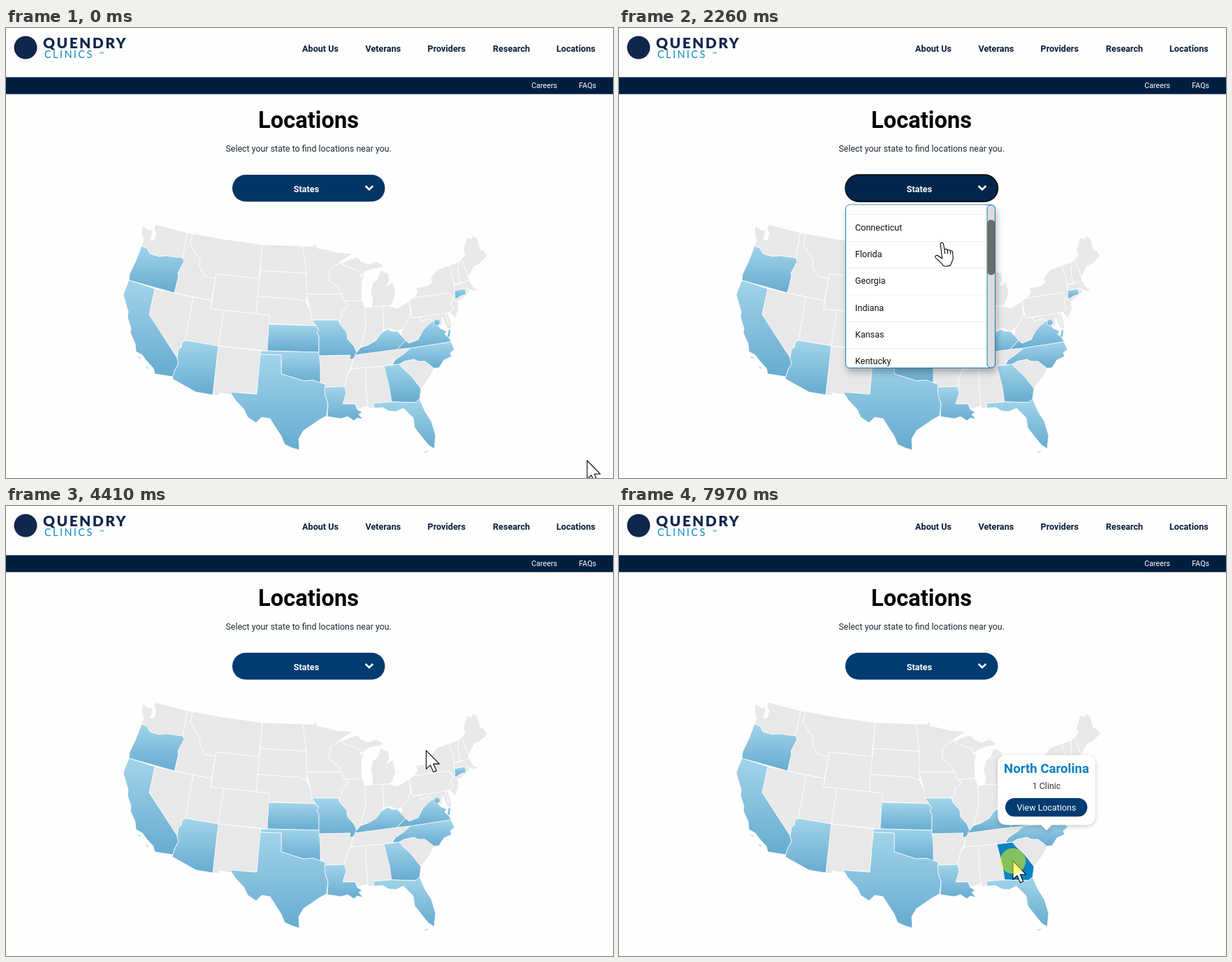
An HTML page that plays this animation: 869 px wide and 644 px high, repeating every 8000 ms.

```html
<!DOCTYPE html>
<html lang="en">
<head>
<meta charset="utf-8">
<title>Locations</title>
<style>
html, body { margin: 0; width: 100%; height: 100%; overflow: hidden; background: #fefefe; }
svg { display: block; width: 100%; height: 100%; font: 12.5px Roboto, sans-serif; }
.b { font-weight: 700; }
.m { text-anchor: middle; }
#map polygon { stroke: #fff; stroke-width: .75; stroke-linejoin: round; }
#grey { fill: #e8e8e8; }
#blue { fill: url(#sky); }
.on { fill: #0a82c4; }
.card { filter: drop-shadow(0 2px 3px #0003); }
</style>
</head>
<body>
<svg viewBox="0 0 869 644">
<defs>
  <linearGradient id="sky" x2="0" y2="1"><stop stop-color="#a2d4ea"/><stop offset="1" stop-color="#66abd0"/></linearGradient>
  <clipPath id="listClip"><rect x="325.5" y="253.5" width="202" height="232" rx="5"/></clipPath>
</defs>
<rect width="869" height="644" fill="#fefefe"/>
<circle cx="28" cy="28" r="16.5" fill="#10264d"/>
<text x="53" y="29" class="b" fill="#10264d" style="font:900 21px Lato,sans-serif;letter-spacing:2.4px">QUENDRY</text>
<text x="55" y="42.5" fill="#1287c6" style="font:14.5px Lato,sans-serif;letter-spacing:2.4px">CLINICS</text>
<text x="134" y="37" fill="#1287c6" font-size="4">SM</text>
<g class="b" font-size="12.65" fill="#071d3b">
  <text x="424" y="34.2">About Us</text><text x="514.5" y="34.2">Veterans</text><text x="603.5" y="34.2">Providers</text>
  <text x="697" y="34.2">Research</text><text x="788" y="34.2">Locations</text>
</g>
<rect y="70.4" width="869" height="24.2" fill="#001f40"/>
<g font-size="10.7" fill="#fff"><text x="752.3" y="86">Careers</text><text x="820.3" y="86">FAQs</text></g>
<text x="433" y="143" class="b m" font-size="32.7">Locations</text>
<text x="433.2" y="177.3" class="m" font-size="12.43" fill="#1d2939">Select your state to find locations near you.</text>

<g id="map">
<g id="grey">
<polygon points="195,283 204,289 210,289 208,300 206,304 212,303 215,294 212,287 214,281 260,293 253,329 230,326 219,327 206,323 202,315 194,312 197,303 194,295"/>
<polygon points="260,293 267,294 264,309 271,322 278,331 277,341 284,355 293,357 300,358 294,390 241,379 247,355 246,351 255,334 253,329"/>
<polygon points="267,294 310,302 367,310 362,359 301,352 300,358 293,357 284,355 277,341 278,331 271,322 264,309"/>
<polygon points="213,373 268,385 257,447 252,450 250,458 245,472 205,410"/>
<polygon points="268,385 294,390 293,402 312,404 304,455 257,447"/>
<polygon points="301,352 363,359 359,409 293,402"/>
<polygon points="312,404 378,411 374,462 304,455"/>
<polygon points="304,455 365,462 359,524 321,521 325,525 306,522 304,526 296,525"/>
<polygon points="367,310 425,312 428,330 430,351 364,347"/>
<polygon points="364,347 430,351 431,381 430,392 418,388 400,387 360,384"/>
<polygon points="360,384 400,387 418,388 430,392 436,405 439,418 444,426 376,423 378,411 359,409"/>
<polygon points="425,312 441,312 443,308 446,315 458,317 472,321 484,322 497,323 482,332 472,340 465,345 463,353 463,362 476,372 481,381 430,381 430,351"/>
<polygon points="430,381 481,381 484,390 490,395 487,401 481,404 481,412 477,418 438,418 436,405"/>
<polygon points="448,469 493,468 492,474 497,474 494,485 488,498 485,513 455,514 455,509 450,508"/>
<polygon points="465,345 472,340 479,336 485,340 497,345 506,348 508,357 513,352 509,366 510,390 484,391 481,381 476,372 463,362 463,353"/>
<polygon points="480,337 492,331 504,328 508,334 519,338 530,334 541,340 536,343 524,345 514,349 508,355 506,348 497,345 485,340"/>
<polygon points="523,400 525,390 522,378 525,365 532,359 536,347 547,351 549,361 545,369 554,363 558,380 553,394 549,398 539,398"/>
<polygon points="484,391 510,390 514,400 515,428 512,440 508,456 502,464 498,455 489,445 488,436 478,424 477,418 481,412 481,404 487,401 490,395"/>
<polygon points="514,400 539,398 541,432 536,438 530,447 518,454 508,456 512,440 515,428"/>
<polygon points="539,398 549,398 561,401 577,391 579,408 575,420 567,431 560,434 550,430 541,432"/>
<polygon points="499,467 560,460 579,458 570,466 557,475 552,482 541,484 494,488 497,474"/>
<polygon points="494,488 515,486 516,520 518,541 504,545 500,538 482,538 487,523 485,513 488,498"/>
<polygon points="515,486 541,484 550,515 553,535 526,537 527,543 520,545 518,541 516,520"/>
<polygon points="563,481 570,477 584,474 590,477 600,477 613,487 607,499 594,516 588,508 580,498 568,487"/>
<polygon points="567,431 575,420 579,408 582,415 592,414 594,420 606,416 611,419 602,427 596,434 590,446 577,451 571,447 566,440"/>
<polygon points="592,414 629,407 633,423 638,424 637,431 632,430 628,422 625,414 624,427 617,424 611,419 606,416 594,420"/>
<polygon points="629,407 633,409 638,424 633,423"/>
<polygon points="579,389 584,386 634,379 640,386 637,395 641,399 637,406 629,408 582,415 577,391"/>
<polygon points="640,386 647,390 648,402 643,415 636,408 641,399 637,395"/>
<polygon points="584,386 589,378 587,372 604,369 610,364 608,358 617,346 634,340 640,357 642,372 643,387 663,379 652,388 645,392 640,386 634,379"/>
<polygon points="642,368 656,364 663,361 667,368 671,373 676,373 672,377 664,375 657,373 642,376"/>
<polygon points="657,373 662,373 663,379 659,381"/>
<polygon points="634,340 648,335 647,347 650,365 642,367 639,355"/>
<polygon points="648,335 652,331 662,356 663,361 656,364 650,365 647,347"/>
<polygon points="652,331 657,325 655,316 660,300 666,302 669,297 675,302 679,317 684,319 689,326 678,337 670,341 662,356"/>
</g>
<g id="blue">
<polygon points="194,312 202,315 206,323 219,327 230,326 253,329 255,334 246,351 247,355 241,379 176,361 177,352 186,333"/>
<polygon points="176,361 213,373 205,410 245,472 247,480 242,489 239,499 213,495 211,487 201,476 195,468 186,463 185,452 178,436 179,430 174,414 175,406 172,396 168,382 171,373"/>
<polygon points="257,447 304,455 296,525 272,521 238,502 242,489 247,480 245,472 247,460 251,457 252,450"/>
<polygon points="376,424 443,426 448,432 445,435 448,441 448,464 374,462"/>
<polygon points="365,462 448,464 450,485 450,508 440,504 426,505 410,500 394,495 394,468 364,467"/>
<polygon points="364,467 394,468 394,495 410,500 426,505 440,504 457,510 457,526 461,538 459,555 448,561 438,568 426,576 419,588 420,604 410,601 399,596 394,584 383,567 378,559 366,557 358,565 346,557 341,546 328,532 321,521 359,524"/>
<polygon points="438,418 476,418 478,424 488,436 489,445 498,455 502,464 500,469 496,474 492,474 493,468 448,469 448,441 445,435 448,432"/>
<polygon points="456,514 485,513 487,523 482,538 500,538 503,546 510,550 505,553 511,560 503,558 498,562 489,556 480,559 460,556 461,538 457,526"/>
<polygon points="541,434 547,431 552,434 560,434 566,440 572,447 560,460 499,468 502,464 508,457 518,454 530,447 536,438"/>
<polygon id="GA" points="541,484 563,481 568,487 580,498 588,508 594,516 592,533 586,536 552,535 549,515"/>
<polygon points="526,537 552,535 586,536 592,531 600,549 609,563 615,583 613,602 605,597 596,586 585,572 583,558 569,544 558,549 548,548 539,543 527,544"/>
<polygon id="NC" points="553,482 557,475 570,466 579,458 637,449 642,460 636,465 638,470 627,475 620,486 613,487 600,477 590,477 584,474 570,477 563,481"/>
<polygon id="VA" points="560,460 572,447 577,451 590,446 596,434 602,427 611,419 617,424 622,430 631,434 628,438 634,443 637,449 579,458"/>
<polygon points="633,432 637,431 635,443 632,441"/>
<polygon points="642,376 657,373 659,381 652,383 643,388"/>
<circle cx="617" cy="421" r="4.5" stroke="#fff" stroke-width=".8"/>
<path d="M187 470l7 2-3 1zM200 483l4 4-2 1zM598 608l8-3-5 1z"/>
</g>
</g>

<rect id="btn" x="324" y="210" width="218.5" height="38.5" rx="19.2" stroke-width="1.4"/>
<text x="430" y="235" class="b m" font-size="12.6" fill="#fff">States</text>
<path d="M514.7 226l5.3 5.2 5.3-5.2" fill="none" stroke="#fff" stroke-width="2.6"/>

<g id="menu">
  <rect x="324.5" y="253" width="214" height="233.5" rx="6" fill="#fff" stroke="#1580bd" style="filter:drop-shadow(2px 6px 5px #0004)"/>
  <g clip-path="url(#listClip)"><g id="rows" font-size="12.6" fill="#111"></g></g>
  <rect x="527" y="253.5" width="11.5" height="232.5" rx="5" fill="#dcdcdc" stroke="#1580bd"/>
  <rect id="thumb" x="527.3" y="253.5" width="11" height="79" rx="5" fill="#6b6b6b"/>
</g>
<g id="cards"></g>
<g id="hint">
  <rect x="620.5" y="477.5" width="72" height="19" fill="#fff" stroke="#8a8a8a"/>
  <text x="657" y="490.3" class="m" style="font:9.6px 'Open Sans',sans-serif" fill="#444">North Carolina</text>
</g>
<g id="cursor" fill="#fff" stroke="#000" stroke-width="1.1" stroke-linejoin="round">
  <path id="arrow" d="M0 0V26.5L6 21 10.5 31 14.7 29.2 10.3 19.3H18.8Z"/>
  <path id="hand" d="M-1.8 2C-1.8-.5 2-.5 2.4 2L4 10C5.5 8.8 7.8 9.2 8.3 11 9.8 10 11.8 10.5 12.3 12 13.8 11.4 15.6 12.2 15.7 14L16.3 22C16 27 13.2 29 12.8 32.5 9 34.3 5 34.3 2 33 0 29-6 25-9 21.5-10.4 18.6-6.8 17.6-4.8 19.2L.7 23ZM4 10l.6 6M8.3 11l.4 5M12.3 12l.3 4.5"/>
</g>
<circle id="press" r="18.3" fill="#ff0" opacity=".5"/>
</svg>
<script>
const $ = id => document.getElementById(id);
const LOOP = 8000, ROW = 38.33, TOP = 253;
const states = ['Arizona', 'California', 'Connecticut', 'Florida', 'Georgia', 'Indiana', 'Kansas', 'Kentucky', 'Louisiana',
  'Michigan', 'Missouri', 'North Carolina', 'Ohio', 'Oklahoma', 'Oregon', 'Texas', 'Virginia', 'Washington DC'];

$('rows').innerHTML = states.map((name, i) => {
  const y = TOP + i * ROW;
  return `<rect x="325" y="${y}" width="203" height="${ROW}" fill="#fff"/>
    <path d="M325 ${y + ROW}h203" stroke="#d9d9d9"/><text x="338" y="${y + 22.6}">${name}</text>`;
}).join('');
const rowRects = [...$('rows').querySelectorAll('rect')];

const card = (id, name, x, y) => `<g id="${id}" class="card" transform="translate(${x} ${y})">
  <path d="M-56-100H56q14 0 14 14V-14q0 14-14 14H8L0 8-8 0H-56q-14 0-14-14V-86q0-14 14-14z" fill="#fff"/>
  <text y="-74.5" class="b m" font-size="18.65" fill="#0a7fc1">${name}</text>
  <text y="-51.5" class="m" font-size="12.4" fill="#333">1 Clinic</text>
  <rect x="-59" y="-38.5" width="117.5" height="26.5" rx="13.2" fill="#003b71"/>
  <text y="-21" class="m" fill="#fff">View Locations</text></g>`;
$('cards').innerHTML = card('cardNC', 'North Carolina', 612, 456.5) + card('cardVA', 'Virginia', 606.7, 433);

// Keys are [time, ...values]; EASE at the end marks an eased arrival.
const EASE = {};
const path = [
  [20, 832, 619], [810, 460, 231, EASE], [1560, 460, 231], [1610, 461, 238], [1960, 462, 307, EASE],
  [3640, 462, 307], [3700, 484, 312], [3950, 545, 325], [4300, 596, 340], [4480, 605, 356],
  [4720, 630, 415], [4960, 607, 441], [5590, 607, 441], [6050, 612, 465, EASE], [7260, 612, 465], [7770, 564, 508, EASE]
];
const scrollKeys = [[2070, 0], [2720, 300, EASE], [2880, 233], [3550, 0]];
const clicks = [[1080, 1220], [5130, 5270], [6710, 6850], [7970, 8000]];

const clamp = v => Math.max(0, Math.min(1, v));
const ramp = (t, a, b) => clamp((t - a) / (b - a));
const within = (t, a, b) => t >= a && t < b;

function sample(keys, t, n) {
  const i = keys.findIndex(k => k[0] > t);
  if (i === 0) return keys[0][n];
  if (i < 0) return keys[keys.length - 1][n];
  const a = keys[i - 1], b = keys[i];
  let p = ramp(t, a[0], b[0]);
  if (b.includes(EASE)) p = p * p * (3 - 2 * p);
  return a[n] + (b[n] - a[n]) * p;
}

const show = (id, on) => $(id).style.display = on ? '' : 'none';
const fade = (id, v) => { show(id, v > 0); $(id).style.opacity = v; };

function draw(t) {
  const x = sample(path, t, 1), y = sample(path, t, 2), scroll = sample(scrollKeys, t, 1);
  const open = ramp(t, 1180, 1420) * (1 - ramp(t, 3950, 4180));
  const onButton = x > 324 && x < 542 && y > 210 && y < 249;
  const onList = open > 0 && x > 325 && x < 538 && y > TOP && y < 486;
  const focus = within(t, 1080, 4000);

  $('btn').setAttribute('fill', onButton || focus ? '#00264b' : t < 1000 ? '#003565' : '#003b71');
  $('btn').setAttribute('stroke', focus ? '#000' : 'none');

  fade('menu', open);
  $('rows').setAttribute('transform', `translate(0 ${-scroll})`);
  $('thumb').setAttribute('y', 253.5 + scroll * 79 / 235);
  const hot = onList && !within(t, 2080, 3560) ? Math.floor((y - TOP + scroll) / ROW) : -1;
  rowRects.forEach((r, i) => r.setAttribute('fill', i === hot ? '#dcdcdc' : '#fff'));

  $('VA').classList.toggle('on', within(t, 4720, 5800));
  $('NC').classList.toggle('on', within(t, 5800, 7480));
  $('GA').classList.toggle('on', t >= 7560);

  fade('cardVA', ramp(t, 5170, 5370) * (1 - ramp(t, 6820, 7060)));
  fade('cardNC', ramp(t, 6810, 6980));
  show('hint', within(t, 6340, 6710));

  const hand = onButton || onList;
  show('hand', hand);
  show('arrow', !hand);
  $('cursor').setAttribute('transform', `translate(${x} ${y})`);
  $('press').setAttribute('transform', `translate(${x} ${y})`);
  show('press', clicks.some(c => within(t, c[0], c[1])));
}

const start = performance.now();
function tick() {
  draw((performance.now() - start) % LOOP);
  requestAnimationFrame(tick);
}
draw(0);
tick();
</script>
</body>
</html>
```
